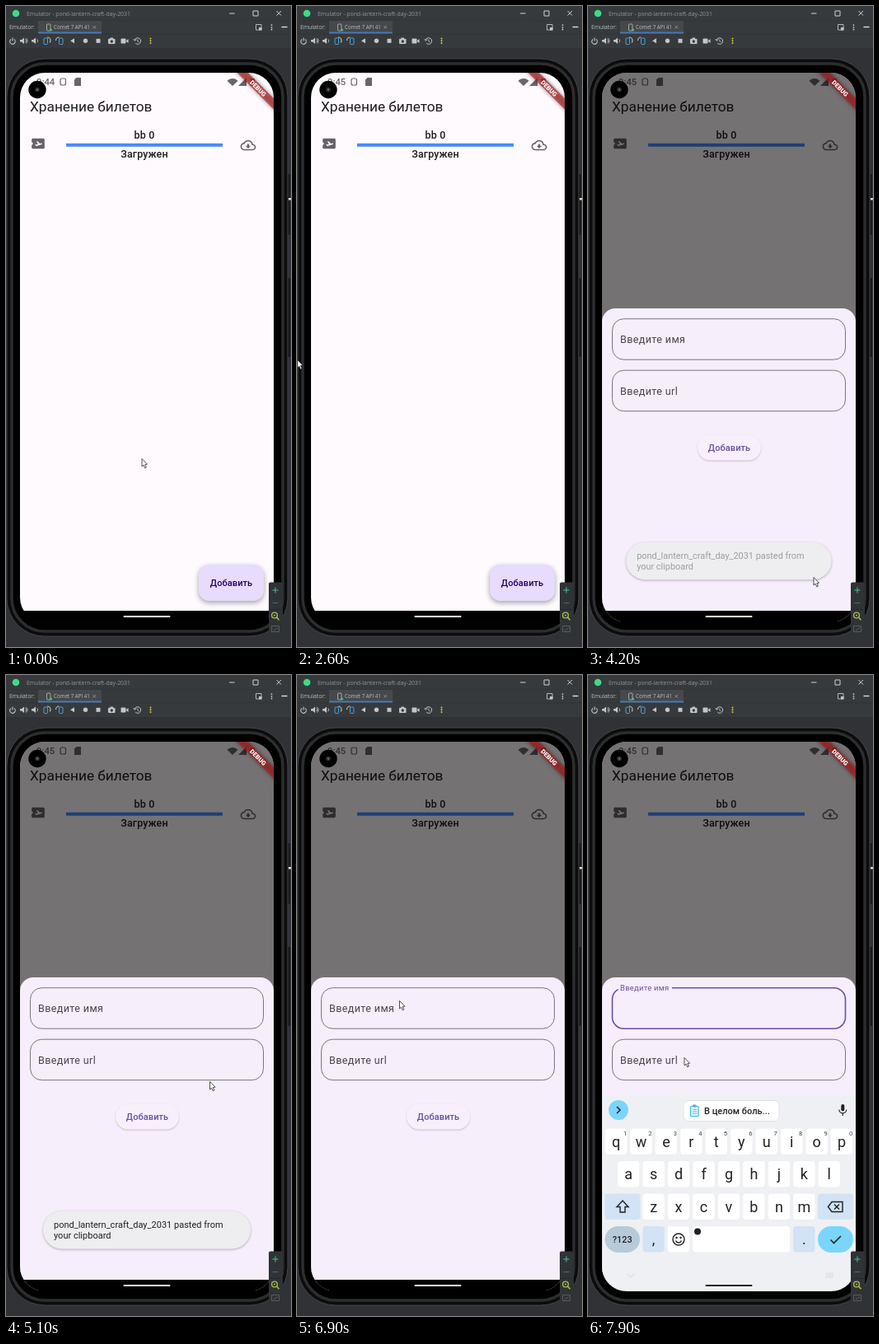
Animation, 346 px wide and 778 px high, one loop 8000 ms. Source, as an HTML page with a canvas:

```html
<!DOCTYPE html>
<html lang="ru">
<head>
<meta charset="utf-8">
<title>Emulator</title>
<style>
  html, body { margin: 0; width: 100%; height: 100%; overflow: hidden; background: #303236; }
  canvas { display: block; width: 346px; height: 778px; }
</style>
</head>
<body>
<canvas id="stage"></canvas>
<script>
const W = 346, H = 778, LOOP = 8000, STEP = 100;
const canvas = document.getElementById('stage');
const ctx = canvas.getContext('2d');
const ratio = window.devicePixelRatio || 1;
canvas.width = W * ratio;
canvas.height = H * ratio;

const ROBOTO = 'Roboto, sans-serif', UI = '"Open Sans", sans-serif';
const INK = '#1d1b20', PURPLE = '#6750a4', SHEET = '#f6eefa', BAR = '#373a3d';

// Pointer stops: time, x, y. The pointer is hidden between the two tracks.
const tracks = [
  [[0, 164.5, 549], [100, 165, 549], [400, 215, 586], [600, 225, 646], [900, 266, 700], [1899, 266, 700]],
  [[2600, 0, 429], [2800, 80, 493], [3000, 130, 545], [3300, 245, 665], [3500, 273.5, 693],
   [4600, 273.5, 693], [4900, 253, 560], [5100, 247, 493], [5500, 217, 369], [5900, 190, 372],
   [6400, 128, 386], [6700, 124, 395], [7500, 124, 395], [7900, 116.5, 464], [8000, 116.5, 464]]
];

const ticketIcon = new Path2D('M20.2 4H4C2.9 4 2 4.9 2 6v4c1.1 0 2 .9 2 2s-.9 2-2 2v4c0 1.1.9 2 2 2h16c1.1 0 2-.9 2-2V6C22 4.9 21.2 4 20.2 4zM17.7 13.3l-8.8 2.4-1.7-2.9.9-.3 1.3 1 2.4-.6-2.4-4.2 1.4-.4 4 3.8 2.4-.7c.5-.1 1 .2 1.2.7.1.5-.2 1-.7 1.2z');
const cloudIcon = new Path2D('M19.4 10C18.7 6.6 15.6 4 12 4 9.1 4 6.6 5.6 5.4 8 2.3 8.4 0 10.9 0 14c0 3.3 2.7 6 6 6h13c2.8 0 5-2.2 5-5 0-2.6-2-4.8-4.6-5zM19 18H6c-2.2 0-4-1.8-4-4 0-2 1.5-3.8 3.6-4l1-.1.5-.9C8.1 7.1 9.9 6 12 6c2.6 0 4.9 1.9 5.4 4.4l.3 1.5 1.5.1c1.6.1 2.8 1.4 2.8 3 0 1.7-1.3 3-3 3zM13.4 10h-2.9v3H8l4 4 4-4h-2.6z');

const clamp = v => Math.max(0, Math.min(1, v));
const mix = (a, b, p) => a + (b - a) * p;

function box(x, y, w, h, r, fill, stroke, lw = 1) {
  ctx.beginPath();
  ctx.roundRect(x, y, w, h, r);
  if (fill) { ctx.fillStyle = fill; ctx.fill(); }
  if (stroke) { ctx.strokeStyle = stroke; ctx.lineWidth = lw; ctx.stroke(); }
}

function raised(x, y, w, h, r, fill, blur, drop, alpha) {
  ctx.save();
  ctx.shadowColor = `rgba(0,0,0,${alpha})`;
  ctx.shadowBlur = blur * ratio;
  ctx.shadowOffsetY = drop * ratio;
  box(x, y, w, h, r, fill);
  ctx.restore();
}

function text(s, x, y, size, color, { weight = 400, align = 'left', font = ROBOTO, spacing = 0 } = {}) {
  ctx.font = `${weight} ${size}px ${font}`;
  ctx.letterSpacing = spacing + 'px';
  ctx.textAlign = align;
  ctx.fillStyle = color;
  ctx.fillText(s, x, y);
}

function line(points, color, lw = 1, closed = false, fill) {
  ctx.beginPath();
  for (let i = 0; i < points.length; i += 2) ctx.lineTo(points[i], points[i + 1]);
  if (closed) ctx.closePath();
  if (fill) { ctx.fillStyle = fill; ctx.fill(); }
  if (color) { ctx.strokeStyle = color; ctx.lineWidth = lw; ctx.stroke(); }
}

function arc(x, y, r, from, to, color, lw = 1) {
  ctx.beginPath();
  ctx.arc(x, y, r, from * Math.PI, to * Math.PI);
  ctx.strokeStyle = color;
  ctx.lineWidth = lw;
  ctx.stroke();
}

function dot(x, y, r, fill) {
  ctx.beginPath();
  ctx.arc(x, y, r, 0, 7);
  ctx.fillStyle = fill;
  ctx.fill();
}

function icon(path, cx, cy, size, color) {
  ctx.save();
  ctx.translate(cx - size / 2, cy - size / 2);
  ctx.scale(size / 24, size / 24);
  ctx.fillStyle = color;
  ctx.fill(path, 'evenodd');
  ctx.restore();
}

function speaker(x, waves) {
  line([x - 4, 41, x - 2, 41, x + 1, 38.5, x + 1, 46, x - 2, 43.5, x - 4, 43.5], null, 1, true, '#c3c5c7');
  for (let i = 1; i <= waves; i++) arc(x + 1, 42.3, 1 + i * 1.5, -0.3, 0.3, '#c3c5c7', 0.9);
}

function rotateIcon(x, dir) {
  box(x - 2 - dir, 39, 4.5, 7.5, 1, null, '#4aa3df', 1);
  arc(x + dir, 42, 4, dir > 0 ? 1.5 : 1, dir > 0 ? 2.2 : 1.5, '#c3c5c7', 1.1);
}

function windowChrome() {
  box(0, 0, W, H, 0, '#303236');
  box(0, 0, W, 51, 0, BAR);
  box(0, 17, W, 0.7, 0, '#323437');
  box(0, 33.5, W, 0.7, 0, '#2f3134');
  dot(12, 9, 4.3, '#3ddc84');
  text('Emulator - pond-lantern-craft-day-2031', 25, 11.5, 6.9, '#93969a', { font: UI });
  line([271, 9, 277.5, 9], '#d0d0d0');
  box(300, 6, 6, 6, 0, null, '#d0d0d0', 1);
  line([328.5, 6, 334, 11.5], '#d0d0d0');
  line([334, 6, 328.5, 11.5], '#d0d0d0');

  text('Emulator:', 4, 28.3, 6.8, '#bbbdbf', { font: UI });
  box(39, 18, 77, 15, 0, '#45494c');
  box(39, 31.5, 77, 2, 0, '#4a78b5');
  box(49.5, 22, 4.5, 8, 1, null, '#aeb1b4', 0.9);
  dot(54.5, 29, 1.6, '#4fc070');
  text('Comet 7 API 41', 58, 28.3, 6.2, '#bbbdbf', { font: UI });
  line([105.5, 24, 109, 27.5], '#9a9da0', 0.8);
  line([109, 24, 105.5, 27.5], '#9a9da0', 0.8);
  box(303.5, 22.5, 6.5, 6.5, 0, null, '#c3c5c7', 0.9);
  box(307, 26, 3.5, 3.5, 0, '#c3c5c7');
  for (let i = -1; i <= 1; i++) {
    dot(322.5, 25.8 + i * 2.7, 0.9, '#d0d0d0');
    dot(175.5, 42.3 + i * 2.7, 1, '#d6cf45');
  }
  line([334.5, 25.5, 341.5, 25.5], '#e4e4e4', 1.3);

  const gray = '#c3c5c7';
  arc(8, 43, 3.2, -0.3, 1.3, gray, 1.1);
  line([8, 38.5, 8, 42.5], gray, 1.1);
  speaker(21, 2);
  speaker(35, 1);
  rotateIcon(49, 1);
  rotateIcon(65.5, -1);
  line([78, 42.3, 83, 39.3, 83, 45.3], null, 1, true, gray);
  dot(96.5, 42.3, 2.7, gray);
  box(109.5, 39.8, 5, 5, 0, gray);
  box(124, 39.7, 8.5, 6.3, 1, gray);
  box(126.5, 38.5, 3.5, 2, 0, gray);
  dot(128.3, 43, 1.7, BAR);
  box(139.5, 39.5, 6, 6, 1, gray);
  line([146, 42, 148.5, 40, 148.5, 45, 146, 43], null, 1, true, gray);
  arc(159.8, 42.5, 3.7, -0.9, 0.75, gray, 1);
  line([154.8, 40, 156.2, 42.3, 158.3, 40.6], gray, 0.9);
  line([159.8, 40.4, 159.8, 42.8, 161.5, 43.8], gray, 0.9);
}

function phoneBody() {
  box(342, 204, 3, 74, 1, '#1a1b1d');
  box(342, 330, 3, 96, 1, '#17181a');
  box(343, 233, 3, 2.5, 0, '#dcdcdc');
  box(1, 64, 341, 701, 46, '#0c0c0d', '#434548', 1);
  box(7, 70, 329, 689, 40, '#000', '#2c2d2f', 3.5);
}

function statusBar(time) {
  const gray = '#69656b';
  text(time, 37, 96.3, 11.3, gray, { weight: 500 });
  box(66, 88, 6.5, 8, 2, null, gray, 1.2);
  line([83, 89.5, 85.5, 87, 91, 87, 91, 97, 83, 97], null, 1, true, gray);
  ctx.beginPath();
  ctx.moveTo(275, 97);
  ctx.arc(275, 97, 9, -0.76 * Math.PI, -0.24 * Math.PI);
  ctx.fillStyle = gray;
  ctx.fill();
  line([282, 97, 292, 97, 292, 87], null, 1, true, gray);
  box(296.5, 88, 5.5, 9, 1, gray);
}

function homePage(time) {
  box(17, 81, 308, 653, 0, '#fffafe');
  statusBar(time);
  text('Хранение билетов', 29, 127.7, 17.25, INK);
  icon(ticketIcon, 39, 167, 18.8, '#66616a');
  icon(cloudIcon, 294, 169, 18.8, '#66616a');
  const label = { weight: 500, align: 'center', spacing: 0.12 };
  text('bb 0', 168, 161, 12.5, INK, label);
  box(73, 166.8, 190, 4, 0, '#448aff');
  text('Загружен', 168, 184, 12.5, INK, label);
  raised(234, 678, 79, 44, 12.5, '#e8dbfd', 6, 2.5, 0.35);
  text('Добавить', 273.5, 704, 11, '#21005d', { weight: 500, align: 'center', spacing: 0.08 });
}

function field(y, label, focus) {
  box(29.5, y, 283, 49.5, 14, null, focus > 0.5 ? PURPLE : '#79747e', 1 + 0.6 * focus);
  if (focus) box(36, y - 2, mix(0, 66, focus), 4, 0, SHEET);
  text(label, 39, mix(y + 29.3, y + 3.5, focus), mix(12.5, 9.4, focus),
    focus > 0.5 ? PURPLE : '#49454f', { spacing: mix(0.4, 0.3, focus) });
}

function bottomSheet(focus) {
  box(17, 81, 308, 653, 0, 'rgba(0,0,0,.54)');
  box(17, 367, 308, 380, [16, 16, 0, 0], SHEET);
  field(379.7, 'Введите имя', focus);
  field(442.2, 'Введите url', 0);
  raised(133, 520.5, 77, 31, 15.5, '#f7f0fb', 2, 1, 0.2);
  text('Добавить', 171.5, 540, 11, PURPLE, { weight: 500, align: 'center', spacing: 0.08 });
}

function key(cx, y, w, fill, label, hint) {
  box(cx - w / 2, y, w, 31.5, 4, fill);
  if (label) text(label, cx, y + 22, 18, '#202124', { align: 'center' });
  if (hint) text(hint, cx + 11, y + 8, 7.5, '#3c4043', { align: 'center' });
}

function letterRow(letters, first, y, hints = '') {
  [...letters].forEach((c, i) => key(first + i * 30.45, y, 26.3, '#fff', c, hints[i]));
}

function keyboard(rise) {
  const tint = '#d1e3f4', cyan = '#7bd5fb', ink = '#202124';
  ctx.save();
  ctx.translate(0, (1 - rise) * 240);
  box(17, 510, 308, 240, 0, '#eff0f3');
  dot(37, 528, 12, cyan);
  line([35, 524, 39, 528, 35, 532], ink, 1.5);
  box(116, 516.5, 116, 25, 6, '#fff', '#dfe1e5', 1);
  box(124.5, 523.5, 9.5, 12, 1, '#e2f5fd', '#45b5e4', 1.2);
  box(127, 521.5, 4.5, 3, 1, '#45b5e4');
  for (let i = 0; i < 3; i++) line([127, 527.5 + i * 2.4, 132, 527.5 + i * 2.4], '#45b5e4', 0.8);
  text('В целом боль...', 141, 533, 11, ink, { weight: 500 });
  box(307.3, 521, 4, 8.5, 2, ink);
  arc(309.3, 527.5, 4.4, 0, 1, ink, 1.2);
  line([309.3, 532, 309.3, 535], ink, 1.2);

  letterRow('qwertyuiop', 34, 550.5, '1234567890');
  letterRow('asdfghjkl', 49.2, 590);
  letterRow('zxcvbnm', 79.6, 629.5);
  key(42, 629.5, 43, tint);
  line([42, 638, 49, 645.5, 45, 645.5, 45, 652, 39, 652, 39, 645.5, 35, 645.5], ink, 1.4, true);
  key(300.5, 629.5, 43, tint);
  line([291.5, 645.5, 296, 639.5, 309, 639.5, 309, 651.5, 296, 651.5], ink, 1.4, true);
  line([299, 642.5, 305, 648.5], ink, 1.4);
  line([305, 642.5, 299, 648.5], ink, 1.4);

  box(20.5, 669, 42.5, 32, 16, '#b6cbda');
  text('?123', 41.7, 689, 10.8, ink, { weight: 500, align: 'center' });
  key(79.6, 669, 26.3, tint, ',');
  key(110, 669, 26.3, '#fff');
  arc(110, 685, 7, 0, 2, ink, 1.4);
  dot(107.5, 683, 1.2, ink);
  dot(112.5, 683, 1.2, ink);
  arc(110, 685.5, 3.5, 0.1, 0.9, ink, 1.4);
  key(186, 669, 118, '#fff');
  dot(133, 675.5, 4, ink);
  key(262.3, 669, 26.3, tint, '.');
  box(279, 669, 43, 32, 16, cyan);
  line([294.5, 685.5, 298.5, 689.5, 307, 681], ink, 1.6);
  line([48, 727, 52, 731, 56, 727], '#dcdde0', 1.2);
  box(288, 725, 10, 7, 1, '#e5e6e9');
  ctx.restore();
}

function toast(t) {
  if (t < 4100 || t >= 6700) return;
  const grow = clamp((t - 4100) / 200), fade = clamp((6700 - t) / 300);
  const scale = mix(0.964, 1, Math.sqrt(grow));
  ctx.save();
  ctx.translate(171, 673.5);
  ctx.scale(scale, scale);
  ctx.translate(-171, -673.5);
  ctx.globalAlpha = fade;
  raised(45, 650.5, 252, 46, 23, '#eeeef0', 3, 1, 0.28);
  ctx.globalAlpha = fade * mix(0.06, 1, grow * grow * 0.6 + grow * 0.4);
  text('pond_lantern_craft_day_2031 pasted from', 58, 671, 11, '#1f1f1f');
  text('your clipboard', 58, 684, 11, '#1f1f1f');
  ctx.restore();
}

function debugBanner() {
  ctx.save();
  ctx.translate(325, 81);
  ctx.rotate(Math.PI / 4);
  raised(-40, 22, 80, 9.4, 0, 'rgba(183,28,28,.63)', 5, 0, 0.7);
  text('DEBUG', 0, 29.5, 7.6, '#fff', { weight: 900, align: 'center' });
  ctx.restore();
}

function zoomPanel() {
  box(319, 699.5, 17, 65, 2, '#303336');
  line([323.5, 709, 330.5, 709], '#3fae8c', 1.2);
  line([327, 705.5, 327, 712.5], '#3fae8c', 1.2);
  line([323.5, 724.5, 330.5, 724.5], '#5d6063', 1.1);
  line([320, 732.5, 335, 732.5], '#232527', 0.8);
  arc(326, 739.5, 3.4, 0, 2, '#a9bd4a', 1.4);
  line([328.5, 742, 331.5, 745.3], '#a9bd4a', 1.6);
  dot(326, 739.5, 1, '#a9bd4a');
  box(322.5, 752.5, 9, 7, 0, null, '#585b5e', 1);
  line([325, 758, 330, 754.5], '#585b5e', 1);
}

function pointerAt(t) {
  const track = tracks.find(k => t >= k[0][0] && t <= k[k.length - 1][0]);
  if (!track) return null;
  const i = Math.max(1, track.findIndex(k => k[0] >= t));
  const [t0, x0, y0] = track[i - 1], [t1, x1, y1] = track[i];
  const p = (t - t0) / (t1 - t0);
  return [mix(x0, x1, p), mix(y0, y1, p)];
}

function pointer(t) {
  const at = pointerAt(t);
  if (!at) return;
  ctx.save();
  ctx.translate(...at);
  line([0.5, 0.5, 0.5, 10, 2.6, 8.2, 4.2, 11.8, 5.9, 11, 4.3, 7.5, 7, 7.2], '#3a3a3e', 0.9, true, '#fff');
  ctx.restore();
}

function draw(t) {
  ctx.setTransform(ratio, 0, 0, ratio, 0, 0);
  const focus = clamp((t - 7100) / 200), rise = clamp((t - 7200) / 300);
  windowChrome();
  phoneBody();

  ctx.save();
  ctx.beginPath();
  ctx.roundRect(17, 81, 308, 667, 30);
  ctx.clip();
  homePage(t < 1300 ? '9:44' : '9:45');
  if (t >= 4200) bottomSheet(focus);
  toast(t);
  debugBanner();
  box(17, 734, 308, 20, 0, '#000');
  if (rise) keyboard(1 - (1 - rise) ** 2);
  box(142.5, 739.9, 57, 2, 1, rise ? '#1c1c1d' : '#f2f2f2');
  ctx.restore();

  dot(38, 101.5, 10.7, '#000');
  dot(38, 101.5, 3, '#26282b');
  dot(38, 101.5, 1.2, '#6c7073');
  zoomPanel();
  pointer(t);
}

function tick(now) {
  const t = now % LOOP;
  draw(t - t % STEP);
  requestAnimationFrame(tick);
}
requestAnimationFrame(tick);
</script>
</body>
</html>
```
